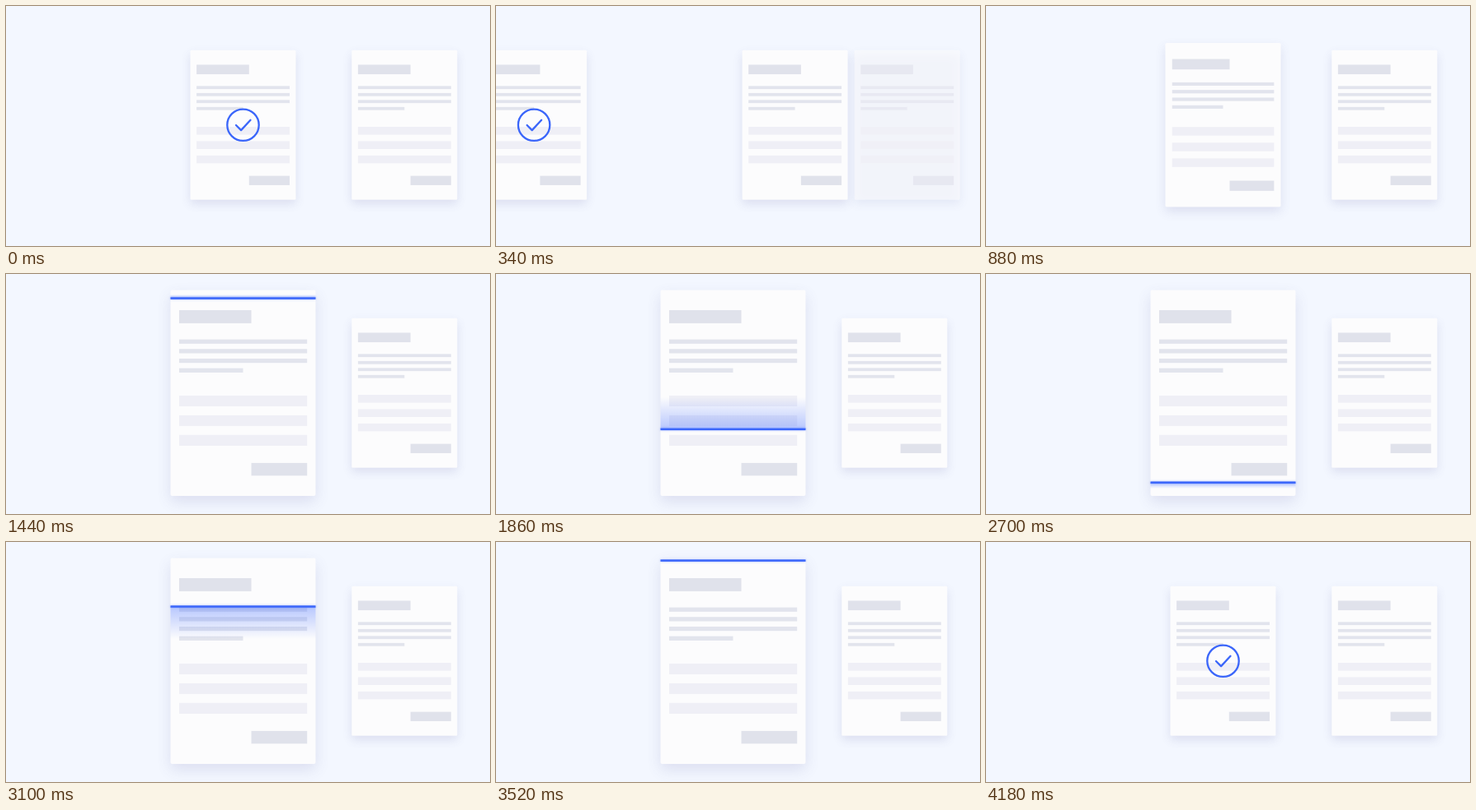
An HTML page with a canvas that plays this animation: 587 by 292 pixels, repeating every 4.2 s.

```html
<!DOCTYPE html>
<html lang="en">
<head>
<meta charset="utf-8">
<title>Document scan</title>
<style>
  html, body { margin: 0; width: 100%; height: 100%; overflow: hidden; background: #f3f7ff; }
  canvas { display: block; }
</style>
</head>
<body>
<canvas id="stage" width="587" height="292"></canvas>
<script>
const ctx = document.getElementById('stage').getContext('2d');
const LOOP = 4200;
const SLIDE = [0, 600], GROW = [700, 1220], SHRINK = [3620, 4140], CHECK = [3820, 4120];
const SCAN_START = 1224, SWEEP = 1200;
const DOC_W = 128, DOC_H = 182.2, BIG = 1.375;
const MID_X = 287.5, MID_Y = 144.75, GAP = 195.8;
const SCAN_TOP = 20.5, SCAN_BOTTOM = 268.5;
const BLUE = '#3b66fa', DARK = '#e0e2eb', LINE = '#e2e4ed', PALE = '#efeff6';

const clamp = v => Math.min(1, Math.max(0, v));
const span = (t, [from, to]) => clamp((t - from) / (to - from));

function bezierEase(x1, x2) {
  return x => {
    if (x <= 0 || x >= 1) return clamp(x);
    let lo = 0, hi = 1;
    for (let i = 0; i < 24; i++) {
      const s = (lo + hi) / 2, r = 1 - s;
      if (3 * x1 * s * r * r + 3 * x2 * s * s * r + s * s * s < x) lo = s; else hi = s;
    }
    return lo * lo * (3 - 2 * lo);
  };
}
const easeInOut = bezierEase(0.42, 0.58);

// Soft start and end with a very fast middle.
function sweepEase(x) {
  const half = v => 0.28 * v ** 2 + 0.22 * v ** 17;
  return x < 0.5 ? half(2 * x) : 1 - half(2 - 2 * x);
}

function bar(color, x, y, w, h) {
  ctx.fillStyle = color;
  ctx.fillRect(x, y, w, h);
}

function drawCheck(alpha) {
  ctx.globalAlpha *= alpha;
  ctx.strokeStyle = BLUE;
  ctx.lineWidth = 2.3;
  ctx.lineCap = ctx.lineJoin = 'round';
  ctx.beginPath();
  ctx.arc(0, 0, 19.2, 0, Math.PI * 2);
  ctx.moveTo(-8.5, 0.2);
  ctx.lineTo(-2.4, 6.4);
  ctx.lineTo(9, -6);
  ctx.stroke();
}

function drawDoc(cx, scale = 1, alpha = 1, check = 0) {
  ctx.save();
  ctx.globalAlpha = alpha;
  ctx.translate(cx, MID_Y);
  ctx.scale(scale, scale);
  ctx.save();
  ctx.translate(-DOC_W / 2, -DOC_H / 2);

  ctx.save();
  ctx.shadowColor = 'rgba(75, 80, 150, 0.14)';
  ctx.shadowBlur = 12 * scale;
  ctx.shadowOffsetY = 5 * scale;
  ctx.fillStyle = '#fcfcfd';
  ctx.beginPath();
  ctx.roundRect(0, 0, DOC_W, DOC_H, 1.5);
  ctx.fill();
  ctx.restore();

  bar(DARK, 7.6, 17.8, 63.7, 11.6);
  for (let i = 0; i < 4; i++) bar(LINE, 7.6, 43.7 + 8.5 * i, i < 3 ? 112.9 : 56.4, 3.8);
  for (let i = 0; i < 3; i++) bar(PALE, 7.6, 93.4 + 17.4 * i, 112.9, 9.5);
  bar(DARK, 71.3, 153, 49.2, 11.3);
  ctx.restore();

  if (check > 0) drawCheck(check);
  ctx.restore();
}

function drawScan(t) {
  const elapsed = t - SCAN_START;
  if (elapsed < 0 || elapsed > 2 * SWEEP) return;
  const down = elapsed < SWEEP;
  const x = (elapsed % SWEEP) / SWEEP;
  const p = sweepEase(x);
  const y = SCAN_TOP + (SCAN_BOTTOM - SCAN_TOP) * (down ? p : 1 - p);
  const length = 42 * Math.min(x / 0.55, (1 - x) / 0.45) ** 2;
  const width = DOC_W * BIG, left = MID_X - width / 2;
  const top = MID_Y - DOC_H * BIG / 2, bottom = MID_Y + DOC_H * BIG / 2;

  ctx.save();
  ctx.globalAlpha = clamp(elapsed / 40) * clamp((2 * SWEEP - elapsed) / 30);
  if (length > 0.5) {
    const tail = down ? Math.max(top, y - length) : Math.min(bottom, y + length);
    const fade = ctx.createLinearGradient(0, y, 0, down ? y - length : y + length);
    fade.addColorStop(0, 'rgba(61, 104, 255, 0.36)');
    fade.addColorStop(1, 'rgba(61, 104, 255, 0)');
    bar(fade, left, Math.min(y, tail), width, Math.abs(tail - y));
  }
  ctx.shadowColor = 'rgba(61, 104, 255, 0.5)';
  ctx.shadowBlur = 3;
  bar(BLUE, left, y - 1.25, width, 2.5);
  ctx.restore();
}

function draw(t) {
  ctx.fillStyle = '#f3f7ff';
  ctx.fillRect(0, 0, 587, 292);

  if (t < SLIDE[1]) {
    const slide = easeInOut(span(t, SLIDE));
    drawDoc(MID_X - 2 * GAP * slide, 1, 1, 1);
    drawDoc(MID_X + GAP + 40 * (1 - slide), 1, slide);
    drawDoc(MID_X + GAP * (1 - slide));
    return;
  }
  const size = easeInOut(span(t, GROW)) - easeInOut(span(t, SHRINK));
  drawDoc(MID_X + GAP);
  drawDoc(MID_X, 1 + (BIG - 1) * size, 1, easeInOut(span(t, CHECK)));
  drawScan(t);
}

const start = performance.now();
function tick() {
  draw((performance.now() - start) % LOOP);
  requestAnimationFrame(tick);
}
tick();
</script>
</body>
</html>
```
